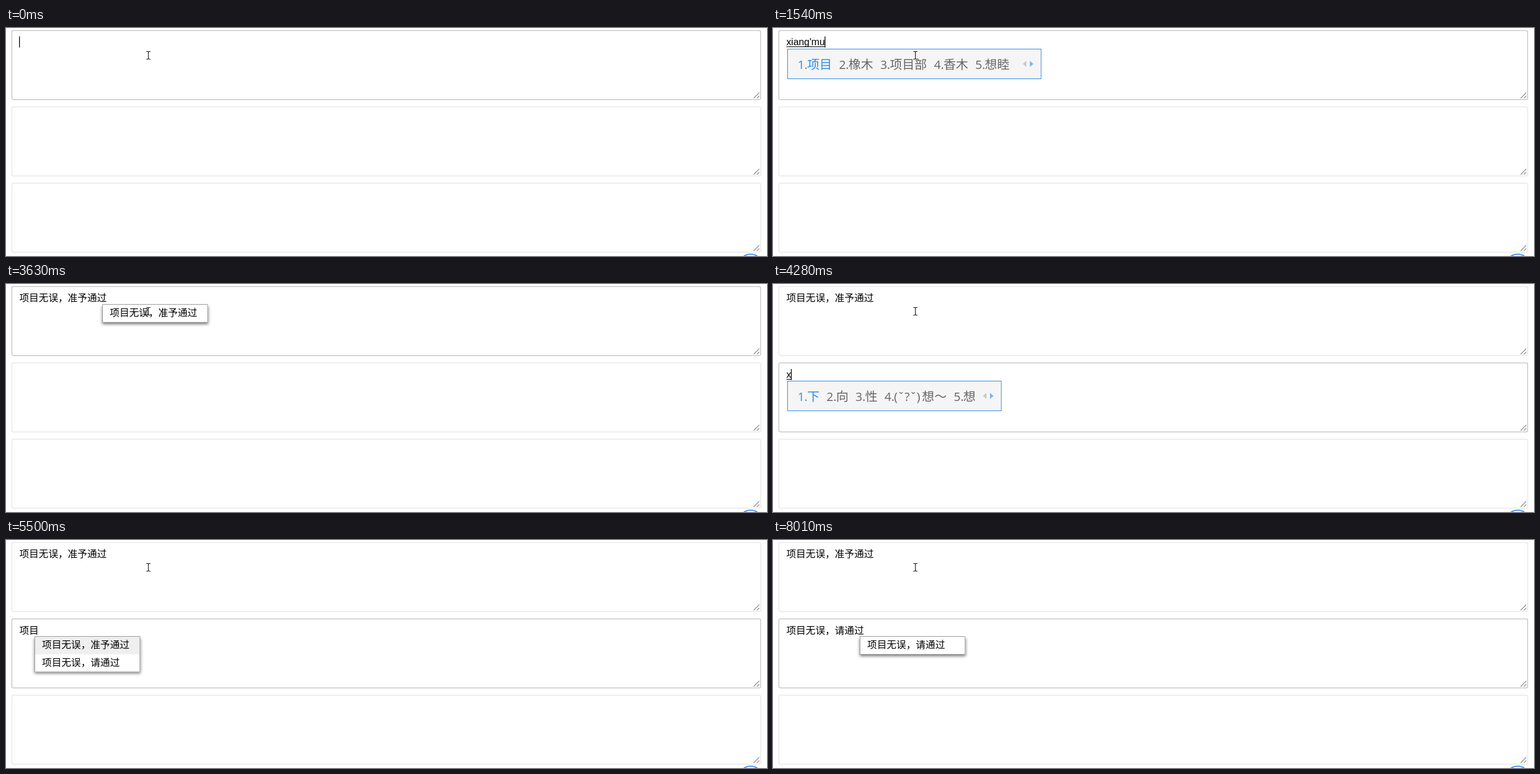
These frames come from a looping animation (1280x384 px, 8.44 s). An HTML page with a canvas:

```html
<!DOCTYPE html>
<html lang="zh-CN">
<head>
<meta charset="utf-8">
<title>Input suggestions</title>
<style>
  html, body { margin: 0; width: 100%; height: 100%; overflow: hidden; background: #fff; }
  canvas { display: block; width: 1280px; height: 384px; }
</style>
</head>
<body>
<canvas id="stage" lang="zh-CN"></canvas>
<script>
const LOOP = 8440;
const FIELD_FONT = '16.33px "Liberation Sans", "Noto Sans CJK SC", "Noto Sans CJK", sans-serif';
const WORD_FONT = '20.8px "Noto Sans CJK SC", "Noto Sans CJK", sans-serif';
const DIGIT_FONT = '20px "Open Sans", "Noto Sans", sans-serif';
const APPROVE = '项目无误，准予通过';
const PLEASE = '项目无误，请通过';

const canvas = document.getElementById('stage');
const ctx = canvas.getContext('2d');
const scale = window.devicePixelRatio || 1;
canvas.width = 1280 * scale;
canvas.height = 384 * scale;

// Candidates offered by the input method for each typed syllable.
const candidates = {
  "x": '下 向 性 (ˇ?ˇ)|想～ 想',
  "x'm": '项目 熊猫 姓名 羡慕 喵',
  "xi": '系 洗 吸 习 惜',
  "xian": '先 线 现 县 闲',
  "xiang": '想 向 像 项 香',
  "xiang'm": '项目 橡木 想买 香米 想美',
  "xiang'mu": '项目 橡木 项目部 香木 想睦'
};

const typing = (at, text, field, open = true) => ({ at, text, field, caret: true, ime: true, open });
const plain = (at, text, field, caret, extra) => ({ at, text, field, caret, ...extra });
const both = { list: [APPROVE, PLEASE] };
const marked = { ...both, active: 0 };

const timeline = [
  plain(0, '', 0, true),
  typing(320, "x", 0),
  typing(540, "x'm", 0),
  typing(870, "x", 0),
  typing(1090, "xi", 0),
  typing(1200, "xian", 0),
  typing(1310, "xiang", 0),
  typing(1420, "xiang'm", 0),
  typing(1540, "xiang'mu", 0),
  plain(1650, '项目', 0, true),
  plain(2090, '项目', 0, true, both),
  plain(2200, '项目', 0, false, both),
  plain(2630, '项目', 0, true, both),
  plain(3070, APPROVE, 0, true),
  plain(3630, APPROVE, 0, false, { list: [APPROVE] }),
  plain(3740, '', 1, true, { focus: 0.5 }),
  plain(3840, '', 1, true),
  typing(4280, "x", 1),
  typing(4400, "xi", 1),
  typing(4510, "xian", 1),
  typing(4620, "xiang", 1),
  typing(4730, "xiang'm", 1),
  typing(4840, "xiang'mu", 1, false),
  plain(4950, '项目', 1, true),
  plain(5390, '项目', 1, true, marked),
  plain(5500, '项目', 1, false, marked),
  plain(5940, '项目', 1, true, marked),
  plain(6480, '项目', 1, false, marked),
  plain(7020, '项目', 1, true, marked),
  plain(7460, PLEASE, 1, true),
  plain(8010, PLEASE, 1, false, { list: [PLEASE] })
];

function write(text, x, y, font, color) {
  ctx.font = font;
  ctx.fillStyle = color;
  ctx.fillText(text, x, y);
  return ctx.measureText(text).width;
}

function path(points, close) {
  ctx.beginPath();
  points.forEach(([x, y]) => ctx.lineTo(x, y));
  if (close) ctx.closePath();
}

function line(points, color, width) {
  path(points);
  ctx.strokeStyle = color;
  ctx.lineWidth = width;
  ctx.stroke();
}

function drawField(index, focus) {
  const y = 4.4 + index * 128.5;
  const gray = Math.round(229 - 37 * focus);
  ctx.beginPath();
  ctx.roundRect(9.8, y, 1259.5, 116.1, 2.5);
  ctx.strokeStyle = `rgb(${gray},${gray},${gray})`;
  ctx.lineWidth = 1.25;
  ctx.stroke();
  line([[1257.5, y + 114], [1267, y + 104.5]], '#777', 1.1);
  line([[1263, y + 114], [1267, y + 110]], '#777', 1.1);
}

function drawCandidates(key, field) {
  const y = 35 + field * 128;
  const words = candidates[key].split(' ');
  const faceWidth = 47;
  const wordWidth = word => {
    const parts = word.split('|');
    return (parts.length > 1 ? faceWidth : 0) + parts.at(-1).length * 20.8;
  };
  const total = words.reduce((sum, word) => sum + 27.9 + wordWidth(word), 0);
  const right = Math.round(41.4 + total + 31) + (key === "xiang'mu" ? 10 : 0);

  ctx.fillStyle = '#f5f5f5';
  ctx.fillRect(24, y, right - 24, 51);
  ctx.strokeStyle = '#2f8ce8';
  ctx.lineWidth = 1;
  ctx.strokeRect(24.5, y + 0.5, right - 24.5, 50);

  let x = 41.4;
  words.forEach((word, i) => {
    const color = i ? '#666' : '#2b8cee';
    const parts = word.split('|');
    write(`${i + 1}.`, x, y + 33.5, DIGIT_FONT, color);
    let wordX = x + 16.1;
    if (parts.length > 1) {
      write(parts[0], wordX, y + 33.5, DIGIT_FONT, color);
      wordX += faceWidth;
    }
    write(parts.at(-1), wordX, y + 33.8, WORD_FONT, color);
    x += 27.9 + wordWidth(word);
  });

  const arrow = (tip, base, color) => {
    path([[tip, y + 25.5], [base, y + 20.5], [base, y + 30.5]], true);
    ctx.fillStyle = color;
    ctx.fill();
  };
  arrow(right - 31, right - 25, '#c6c8ce');
  arrow(right - 13, right - 19, '#7fb6f2');
}

function drawSuggestions(state, textWidth) {
  const left = Math.round(14.9 + textWidth);
  const top = 34 + state.field * 128;
  const height = state.list.length * 29.5 + 1.5;
  ctx.save();
  ctx.shadowColor = 'rgba(0,0,0,0.55)';
  ctx.shadowBlur = 5 * scale;
  ctx.shadowOffsetY = 2.5 * scale;
  ctx.fillStyle = '#fff';
  ctx.fillRect(left, top, 177.5, height);
  ctx.restore();
  if (state.active !== undefined) {
    ctx.fillStyle = '#efefef';
    ctx.fillRect(left + 1, top + 1 + state.active * 29.5, 175.5, 29.5);
  }
  ctx.strokeStyle = '#a0a0a0';
  ctx.lineWidth = 1;
  ctx.strokeRect(left + 0.5, top + 0.5, 176.5, height - 1);
  state.list.forEach((item, i) =>
    write(item, left + 12.6, top + 20.3 + i * 29.4, FIELD_FONT, '#000'));
}

function drawPointer() {
  line([[236, 39.5], [238.5, 39.5], [239.5, 40.5], [240.5, 39.5], [243, 39.5]], '#222', 1.1);
  line([[236, 52.5], [238.5, 52.5], [239.5, 51.5], [240.5, 52.5], [243, 52.5]], '#222', 1.1);
  line([[239.5, 40], [239.5, 52]], '#222', 1.2);
}

function draw(time) {
  const state = timeline.findLast(step => step.at <= time);
  const focus = state.focus ?? 1;
  ctx.setTransform(scale, 0, 0, scale, 0, 0);
  ctx.fillStyle = '#fff';
  ctx.fillRect(0, 0, 1280, 384);

  for (let i = 0; i < 3; i++) {
    drawField(i, i === state.field ? focus : i < state.field ? 1 - focus : 0);
  }
  ctx.beginPath();
  ctx.arc(1252.5, 400.8, 20, 0, Math.PI * 2);
  ctx.strokeStyle = '#3a8bee';
  ctx.lineWidth = 1.8;
  ctx.stroke();

  if (state.field === 1) write(APPROVE, 22.4, 29.3, FIELD_FONT, '#000');
  const shift = state.field * 129;
  const width = write(state.text, 22.4, 29.3 + shift, FIELD_FONT, '#000');
  if (state.ime) {
    ctx.fillStyle = '#000';
    ctx.fillRect(22.6, 31 + shift, width, 1.1);
  }
  if (state.ime && state.open) drawCandidates(state.text, state.field);
  if (state.list) drawSuggestions(state, width);
  if (state.caret) {
    ctx.fillStyle = '#000';
    ctx.fillRect(22 + width, 14.2 + shift, 1.3, 18.6);
  }
  drawPointer();
}

const start = performance.now();
function tick() {
  draw((performance.now() - start) % LOOP);
  requestAnimationFrame(tick);
}
tick();
</script>
</body>
</html>
```
